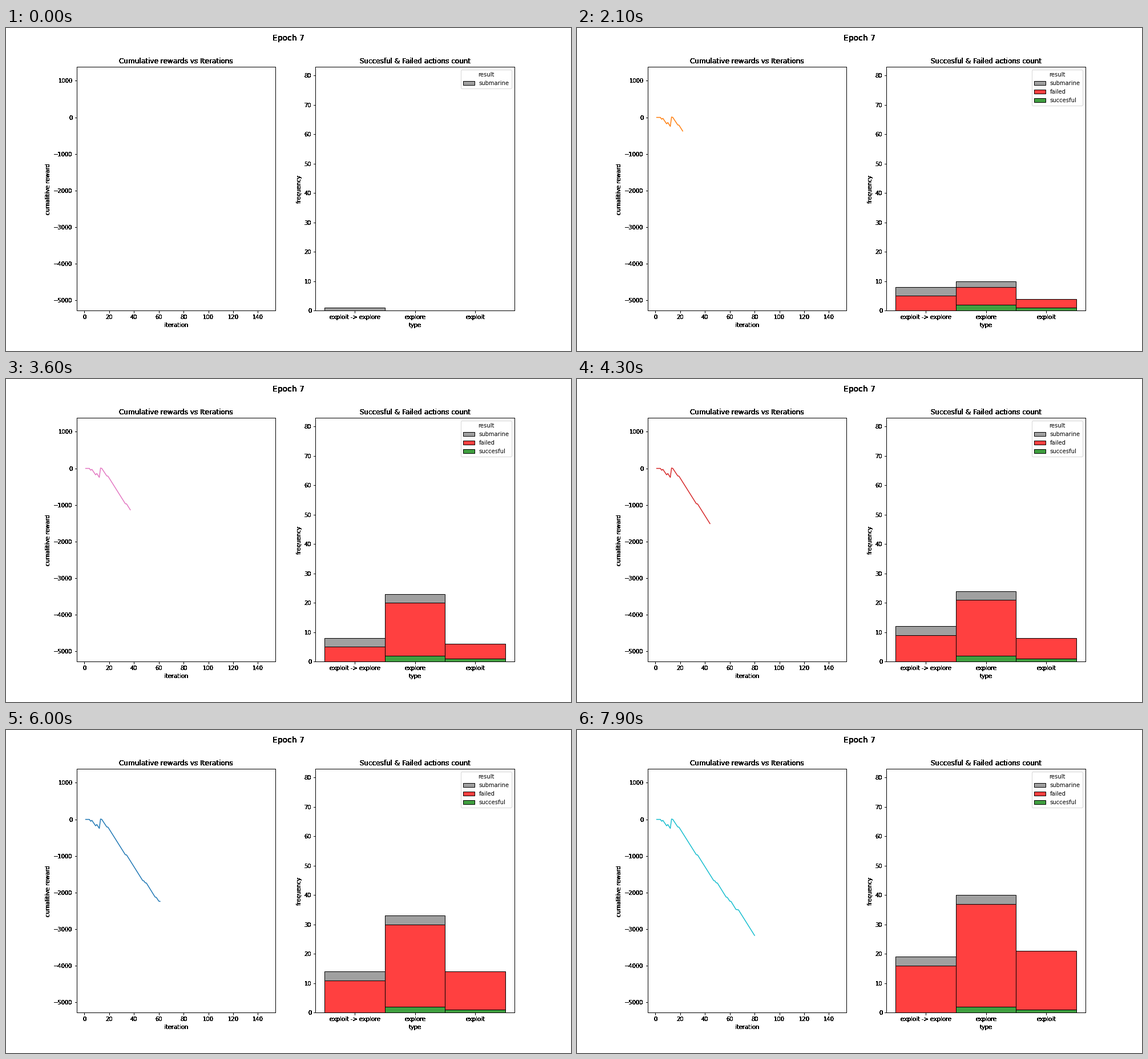
These frames come from a looping animation (990 by 566 pixels, 8000 ms). A matplotlib script:

```python
import numpy as np
import matplotlib.pyplot as plt
from matplotlib.animation import FuncAnimation
from matplotlib.colors import to_rgba
from matplotlib.patches import Patch

plt.rcParams["font.family"] = "DejaVu Sans"
plt.rcParams["axes.linewidth"] = 1

STEPS = 80

# One letter per step: x = exploit -> explore, e = explore, p = exploit
KINDS = "xep"
ACTIONS = (
    "xexeeepxxepxp" "xeeeexepxepepee" "eeeeeeeee" "xpxexpx"
    "eepexpeeppe" "epxepe" "epexpxpxexp" "epexpepe"
)
SUBMARINE = {1, 2, 3, 4, 14, 34}
SUCCESS = {6, 10, 13}
RESULTS = ["submarine", "failed", "succesful"]
COLORS = [to_rgba(c, 0.75) for c in ("gray", "red", "green")]

# Corners of the cumulative reward curve
CORNERS = [
    (1, 0), (4, 0), (5, -50), (6, -25), (9, -175), (10, -140), (12, -245),
    (13, 10), (14, 0), (18, -205), (19, -212), (33, -965), (34, -970),
    (47, -1670), (48, -1680), (49, -1730), (50, -1738), (57, -2120),
    (58, -2130), (60, -2232), (61, -2240), (65, -2460), (67, -2470),
    (80, -3170),
]
steps = np.arange(1, STEPS + 1)
reward = np.interp(steps, *zip(*CORNERS))


def result_of(step):
    if step in SUBMARINE:
        return 0
    return 2 if step in SUCCESS else 1


# counts[step, result, kind], accumulated over the steps
counts = np.zeros((STEPS, 3, 3), int)
for i, action in enumerate(ACTIONS):
    counts[i, result_of(i + 1), KINDS.index(action)] = 1
counts = counts.cumsum(axis=0)


def solid(img, dpi):
    """Turn soft glyph edges into hard black pixels."""
    out = np.zeros_like(img)
    out[..., 3] = img[..., 3] > 0.12
    return out, 0, 0


def label(ax, title, xlabel, ylabel):
    ax.set_title(title, fontsize=12)
    ax.set_xlabel(xlabel)
    ax.set_ylabel(ylabel)
    for artist in (ax.title, ax.xaxis, ax.yaxis):
        artist.set_agg_filter(solid)


fig, (left, right) = plt.subplots(1, 2, figsize=(990 / 72, 566 / 72), dpi=72)
fig.subplots_adjust(left=0.125, right=0.9, bottom=0.125, top=0.88, wspace=0.2)
fig.suptitle("Epoch 7", fontsize=14).set_agg_filter(solid)

left.set_xticks(range(0, 141, 20))
left.set_yticks(range(-5000, 1001, 1000))
left.set_xlim(-6.3, 154.3)
left.set_ylim(-5277, 1383)
label(left, "Cumulative rewards vs Iterations", "iteration", "cumalitive reward")
line, = left.plot([], [], lw=1.5)

right.set_xticks(range(3), ["exploit -> explore", "explore", "exploit"])
right.set_yticks(range(0, 81, 10))
right.set_xlim(-0.65, 2.65)
right.set_ylim(0, 82.95)
label(right, "Succesful & Failed actions count", "type", "frequency")
bars = [
    right.bar(range(3), [0] * 3, width=1, color=c, edgecolor="black", linewidth=1)
    for c in COLORS
]
right.set_xlim(-0.65, 2.65)
right.set_ylim(0, 82.95)
handles = [
    Patch(facecolor=c, edgecolor="black", linewidth=1, label=r)
    for c, r in zip(COLORS, RESULTS)
]


def update(i):
    line.set_data(steps[:i + 1], reward[:i + 1])
    line.set_color(f"C{i % 10}")

    base = np.zeros(3, int)
    for k in (2, 1, 0):
        for bar, y, h in zip(bars[k], base, counts[i, k]):
            bar.set_y(y)
            bar.set_height(h)
            bar.set_visible(bool(h))
        base = base + counts[i, k]

    seen = [h for h, n in zip(handles, counts[i].sum(axis=1)) if n]
    right.legend(handles=seen, title="result", loc="upper right")
    return []


anim = FuncAnimation(fig, update, frames=STEPS, interval=100,
                     init_func=lambda: update(0), repeat=True)
plt.show()
```
